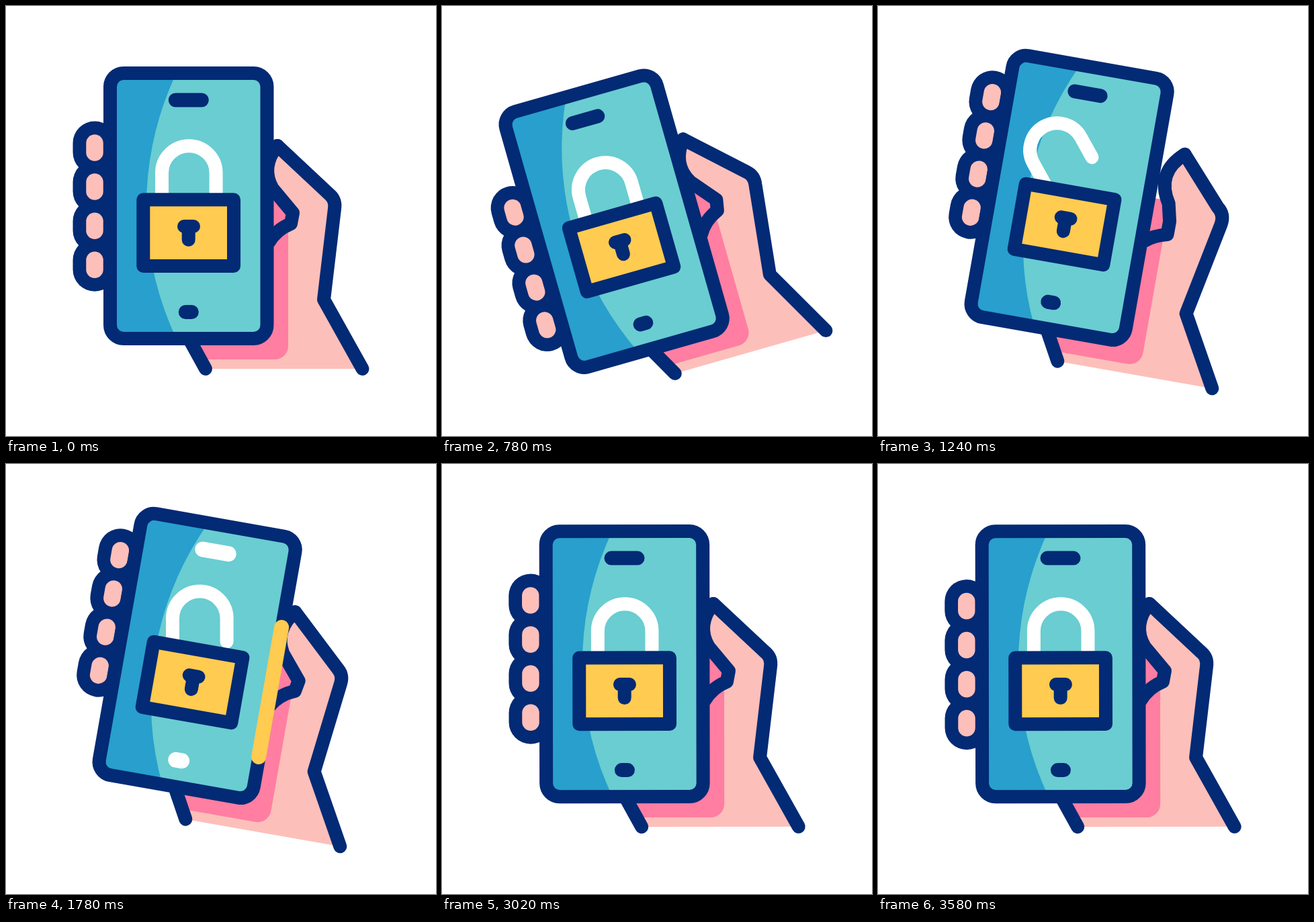
These frames come from a looping animation (640 px wide and 640 px high, 3600 ms). An HTML page with a canvas:

```html
<!DOCTYPE html>
<html lang="en">
<head>
<meta charset="utf-8">
<title>Phone lock</title>
<style>
  html, body { margin: 0; width: 100%; height: 100%; overflow: hidden; background: #fff; }
  canvas { display: block; width: 640px; height: 640px; }
</style>
</head>
<body>
<canvas id="stage" width="640" height="640"></canvas>
<script>
const ctx = document.getElementById('stage').getContext('2d');
const LOOP = 3600;
const NAVY = '#032a74', SKIN = '#fdbfba', PINK = '#ff7ea1', BLUE = '#289fcd';
const TEAL = '#69cdd1', YELLOW = '#ffcb50', WHITE = '#fff';
const PIVOT = [347, 365];
const RAD = Math.PI / 180;

// Keyframes as [time, value] pairs, eased in and out.
const TILT = [[0, 0], [425, -16], [765, -16], [1180, 10], [2820, 10], [3220, -10], [3600, 0]];
const GRIP = [[0, 0], [425, 33], [765, 33], [1180, -41], [2820, -41], [3220, 24], [3600, 0]];
const LIFT = [[1080, 0], [1380, 1.8], [1680, 0]];
const SHACKLE = [[820, 0], [1240, -39], [1560, -39], [1890, 0]];
const RING_HEAD = [[1694, 0], [2037, 1]];
const RING_TAIL = [[2330, 0], [2673, 1]];
const PILL_POP = [[1460, 0], [1600, 1.35], [1720, 1], [2600, 1], [2720, 1.35], [2860, 0]];

function track(keys, t) {
  if (t <= keys[0][0]) return keys[0][1];
  for (let i = 1; i < keys.length; i++) {
    const [t0, a] = keys[i - 1], [t1, b] = keys[i];
    if (t < t1) {
      const u = (t - t0) / (t1 - t0);
      return a + (b - a) * u * u * (3 - 2 * u);
    }
  }
  return keys[keys.length - 1][1];
}

function fill(path, color) {
  ctx.fillStyle = color;
  ctx.fill(path);
}

function stroke(path, color, width = 20) {
  ctx.strokeStyle = color;
  ctx.lineWidth = width;
  ctx.stroke(path);
}

function line(x0, y0, x1, y1, color, width = 20) {
  const path = new Path2D();
  path.moveTo(x0, y0);
  path.lineTo(x1, y1);
  stroke(path, color, width);
}

function drawHand(lift) {
  const at = (x, y, dx, dy) => [x + dx * lift, y + dy * lift];
  const tip = at(404, 208, 26, -4);
  const knuckleIn = at(482, 281, 10, -8);
  const knuckle = at(491, 289, 13, -7);
  const knuckleOut = at(489, 302, 12, -4);
  const side = at(378, 240, 14, -2);
  const crease = at(397, 272, 22, 8);
  const apex = at(427, 308, -2, -2);
  const low = at(424, 324, 1, 2);
  const end = at(391, 352, 4, -12);
  const foldBend = at(402, 333, 4, -2);

  const back = path => {
    path.moveTo(...tip);
    path.lineTo(...knuckleIn);
    path.quadraticCurveTo(...knuckle, ...knuckleOut);
  };
  const inner = path => {
    path.lineTo(...crease);
    path.quadraticCurveTo(...side, ...tip);
  };

  const body = new Path2D();
  back(body);
  body.lineTo(473, 437);
  body.lineTo(530.5, 540);
  body.lineTo(297, 540);
  body.lineTo(270, 491);
  body.lineTo(380, 352);
  body.lineTo(...end);
  body.lineTo(...low);
  body.lineTo(...apex);
  inner(body);
  fill(body, SKIN);

  const palm = new Path2D();
  palm.moveTo(380, 276);
  palm.lineTo(420, 276);
  palm.arcTo(420, 526, 400, 526, 20);
  palm.lineTo(289, 526);
  palm.lineTo(270, 491);
  palm.lineTo(380, 480);
  fill(palm, PINK);

  const thumb = new Path2D();
  back(thumb);
  thumb.lineTo(450, 320);
  thumb.lineTo(...apex);
  inner(thumb);
  fill(thumb, SKIN);

  const fold = new Path2D();
  fold.moveTo(...tip);
  fold.quadraticCurveTo(...side, ...crease);
  fold.lineTo(...apex);
  fold.lineTo(...low);
  fold.quadraticCurveTo(...foldBend, ...end);
  stroke(fold, NAVY);

  const outline = new Path2D();
  back(outline);
  outline.lineTo(473, 437);
  outline.lineTo(530.5, 540);
  stroke(outline, NAVY);
  line(270, 491, 297, 540, NAVY);
}

function drawFingers(offset) {
  for (const [color, width] of [[NAVY, 65], [SKIN, 25.5]]) {
    for (let i = 0; i < 4; i++) {
      const y = 211 + offset + i * 58.1;
      line(132, y - 7, 132, y + 7, color, width);
    }
  }
}

function drawPhone() {
  const frame = new Path2D();
  frame.roundRect(155, 100, 233.5, 395, 20);
  fill(frame, BLUE);
  const glare = new Path2D();
  glare.arc(668, 297.5, 459, 0, 2 * Math.PI);
  ctx.save();
  ctx.clip(frame);
  fill(glare, TEAL);
  ctx.restore();
  stroke(frame, NAVY);
}

// Short horizontal pill, covered by a white one that pops in and out.
function drawPill(cx, cy, half, pop) {
  line(cx - half, cy, cx + half, cy, NAVY, 21);
  if (pop < 0.01) return;
  ctx.save();
  ctx.translate(cx, cy);
  ctx.scale(pop, pop);
  line(-half, 0, half, 0, WHITE, 23);
  ctx.restore();
}

function drawRing(tail, head) {
  if (head <= 0 || tail >= 1) return;
  const ring = new Path2D();
  ring.moveTo(388, 234);
  ring.arcTo(388, 495, 300, 495, 20);
  ring.arcTo(155, 495, 155, 300, 20);
  ring.arcTo(155, 100, 300, 100, 20);
  ring.arcTo(388, 100, 388, 200, 20);
  ring.lineTo(388, 234);
  const total = 2 * (193 + 355) + 40 * Math.PI;
  ctx.save();
  ctx.setLineDash([(head - tail) * total, total * 2]);
  ctx.lineDashOffset = -tail * total;
  stroke(ring, YELLOW, 22);
  ctx.restore();
}

function drawLock(angle) {
  ctx.save();
  ctx.translate(232, 283);
  ctx.rotate(angle * RAD);
  const shackle = new Path2D();
  shackle.moveTo(0, 0);
  shackle.lineTo(0, -34.5);
  shackle.arc(40.3, -34.5, 40.3, Math.PI, 0);
  shackle.lineTo(80.6, 0);
  stroke(shackle, WHITE);
  ctx.restore();

  const box = new Path2D();
  box.rect(204.3, 288.3, 134.7, 98.7);
  fill(box, YELLOW);
  stroke(box, NAVY);
  line(265, 328, 279, 328, NAVY);
  line(271.7, 330, 271.7, 348, NAVY);
}

function draw(t) {
  ctx.setTransform(1, 0, 0, 1, 0, 0);
  ctx.fillStyle = WHITE;
  ctx.fillRect(0, 0, 640, 640);
  ctx.lineCap = ctx.lineJoin = 'round';
  ctx.translate(...PIVOT);
  ctx.rotate(track(TILT, t) * RAD);
  ctx.translate(-PIVOT[0], -PIVOT[1]);

  const pop = track(PILL_POP, t);
  drawHand(track(LIFT, t));
  drawFingers(track(GRIP, t));
  drawPhone();
  drawPill(271.8, 140, 19.5, pop);
  drawPill(271.8, 455.5, 4.5, pop);
  drawRing(track(RING_TAIL, t), track(RING_HEAD, t));
  drawLock(track(SHACKLE, t));
}

const start = performance.now();
function tick() {
  draw((performance.now() - start) % LOOP);
  requestAnimationFrame(tick);
}
tick();
</script>
</body>
</html>
```
